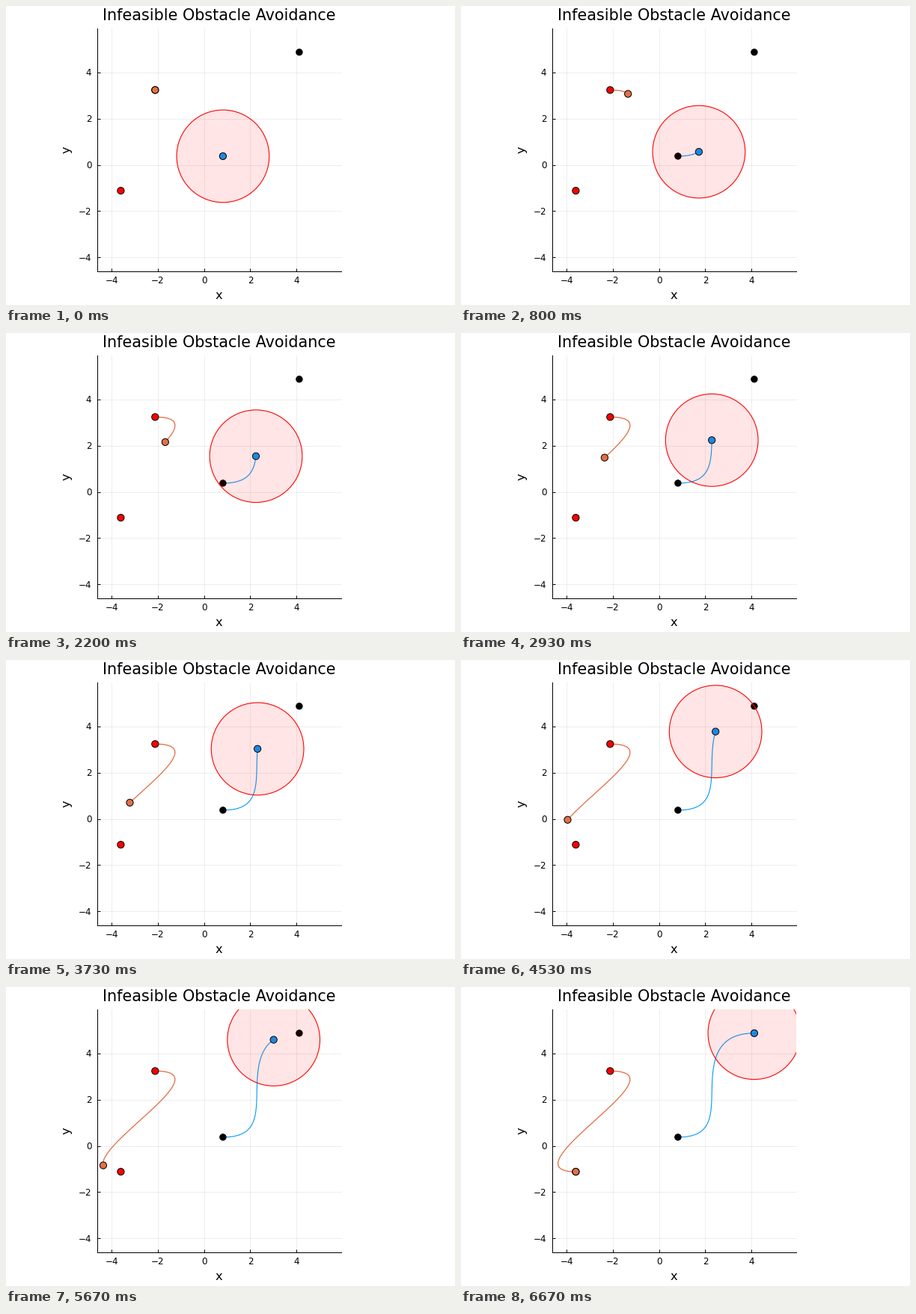
Write a matplotlib script that moves like this. It is 600 by 400 pixels and loops after 6740 ms.

```python
import numpy as np
import matplotlib.pyplot as plt
from matplotlib.animation import FuncAnimation
from matplotlib.patches import Circle, Rectangle

W, H, DPI = 600, 400, 100
STEPS, SUB, LOOP_MS = 101, 3, 6740  # SUB ticks of the clock per step
PT = 72 / DPI  # one pixel in points

LEFT, TOP, RIGHT, BOTTOM = 122, 30, 447.5, 355
X0, Y0, UNIT = 264.6, 212.6, 30.92
BLUE, ORANGE = "#009afa", "#e36f47"


def course(start, end, bend_x, bend_y):
    """Ease from start to end, bent sideways by u(1-u) times a polynomial."""
    u = np.linspace(0, 1, STEPS)
    ease = u * u * (3 - 2 * u)
    return np.column_stack([
        a + (b - a) * ease + u * (1 - u) * np.polyval(bend, u)
        for a, b, bend in zip(start, end, (bend_x, bend_y))])


blue_path = course((289.9, 200.9), (391.9, 61.8),
                   (-170, 370, -828, 321), (-60, 94, -34, 0))
orange_path = course((199.3, 112.4), (153.4, 247.1),
                     (-615, 317), (16, -16, 0))

fig = plt.figure(figsize=(W / DPI, H / DPI), dpi=DPI, facecolor="white")
ax = fig.add_axes([0, 0, 1, 1])
ax.set_xlim(0, W)
ax.set_ylim(H, 0)
ax.axis("off")


def line(xs, ys, color="black", width=1.0, **kw):
    return ax.plot(xs, ys, color=color, lw=width * PT, **kw)[0]


def text(x, y, s, size, **kw):
    opts = dict(ha="center", va="baseline", family="DejaVu Sans", color="black")
    ax.text(x, y, s, fontsize=size * PT, **{**opts, **kw})


def dot(pos, color, r=4.6, z=4):
    return ax.add_patch(Circle(pos, r, facecolor=color, edgecolor="black",
                               lw=1.0 * PT, zorder=z))


# Axes, grid and labels
for v in range(-4, 5, 2):
    x, y = X0 + v * UNIT, Y0 - v * UNIT
    label = str(v).replace("-", "\u2212")
    line([x, x], [TOP, BOTTOM], alpha=0.065, zorder=1)
    line([LEFT, RIGHT], [y, y], alpha=0.065, zorder=1)
    line([x, x], [BOTTOM - 4, BOTTOM], zorder=2, solid_capstyle="butt")
    line([LEFT, LEFT + 4], [y, y], zorder=2, solid_capstyle="butt")
    text(x + 0.3, 371, label, 11.9)
    text(114.3, y + 4.5, label, 11.9, ha="right")
line([LEFT, LEFT], [TOP, BOTTOM], zorder=2)
line([LEFT, RIGHT], [BOTTOM, BOTTOM], zorder=2)
text(284.6, 19, "Infeasible Obstacle Avoidance", 20.75)
text(284.3, 391.6, "x", 16.3)
text(86, 192.6, "y", 16.3, rotation=90, rotation_mode="anchor")

# Start and goal markers
for path, color, r in ((blue_path, "black", 4.2), (orange_path, "red", 4.6)):
    dot(path[0], color, r)
    dot(path[-1], color, r)

blue_trail = line([], [], BLUE, 1.1, zorder=3)
orange_trail = line([], [], ORANGE, 1.3, zorder=3)
blue_dot = dot(blue_path[0], BLUE, z=5)
orange_dot = dot(orange_path[0], ORANGE, z=5)

# Tinted disc lies over everything inside it
disc = Circle(blue_path[0], 2 * UNIT, facecolor=(1, 0, 0, 0.1),
              edgecolor="red", lw=1.1 * PT, zorder=6)
ax.add_patch(disc)
window = Rectangle((LEFT, TOP), RIGHT - LEFT, BOTTOM - TOP,
                   transform=ax.transData)
disc.set_clip_path(window)


def update(tick):
    n = min((tick + 1) // SUB, STEPS - 1)
    blue_trail.set_data(*blue_path[:n + 1].T)
    orange_trail.set_data(*orange_path[:n + 1].T)
    blue_dot.center = disc.center = tuple(blue_path[n])
    orange_dot.center = tuple(orange_path[n])
    return blue_trail, orange_trail, blue_dot, orange_dot, disc


anim = FuncAnimation(fig, update, frames=STEPS * SUB,
                     interval=LOOP_MS / (STEPS * SUB),
                     repeat=True, repeat_delay=0, blit=False)
plt.show()
```
